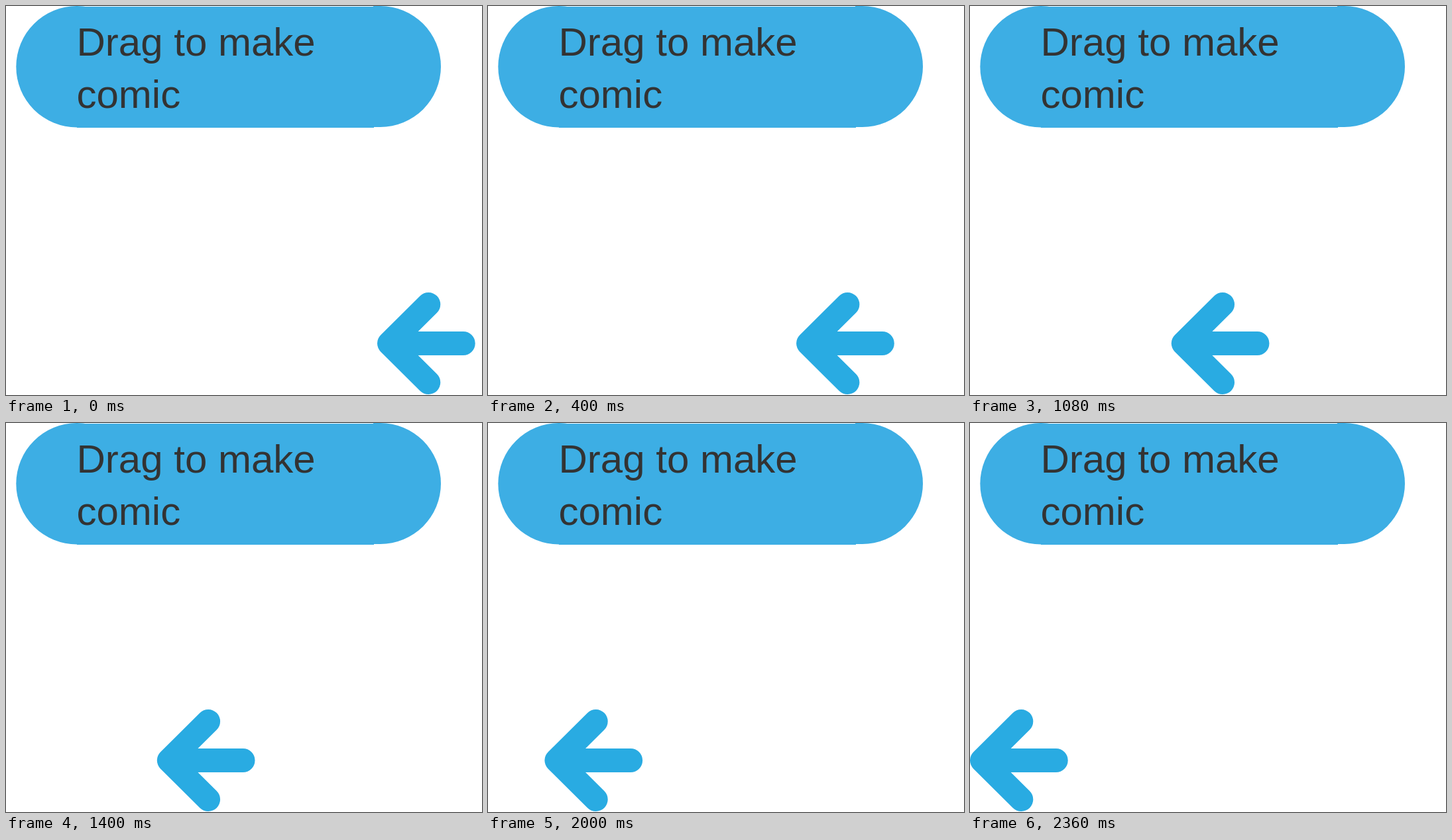
An HTML page that plays this animation: 718 by 588 pixels, repeating every 2400 ms.

```html
<!DOCTYPE html>
<html lang="en">
<head>
<meta charset="utf-8">
<title>Drag to make comic</title>
<style>
  html, body { margin: 0; width: 100%; height: 100%; overflow: hidden; background: #fff; }
  svg { display: block; width: 718px; height: 588px; }
  text { font: 60px "Liberation Sans", Arial, sans-serif; fill: #333; }
</style>
</head>
<body>
<svg viewBox="0 0 718 588">
  <g fill="#3daee4">
    <circle cx="107" cy="91.8" r="91.7"/>
    <rect x="107" y="1" width="448" height="183"/>
    <path d="M554 0H564.5A91.5 91.5 0 0 1 564.5 183H554Z"/>
  </g>
  <text x="106.5" y="75">Drag to make</text>
  <text x="106.5" y="153.5">comic</text>
  <path id="arrow" d="M77.3 451 18 510 77.3 569M36 510H129.7" fill="none"
    stroke="#29abe2" stroke-width="36" stroke-linecap="round" stroke-linejoin="round"/>
</svg>
<script>
  const LOOP = 2400, STEP = 40, START = 560;
  const LAST = LOOP / STEP - 1;
  const arrow = document.getElementById('arrow');

  function draw(ms) {
    const step = Math.floor((ms % LOOP) / STEP);
    const x = START * (1 - step / LAST);
    arrow.setAttribute('transform', `translate(${x.toFixed(2)} 0)`);
  }

  const t0 = performance.now();
  function tick() {
    draw(performance.now() - t0);
    requestAnimationFrame(tick);
  }
  tick();
</script>
</body>
</html>
```
